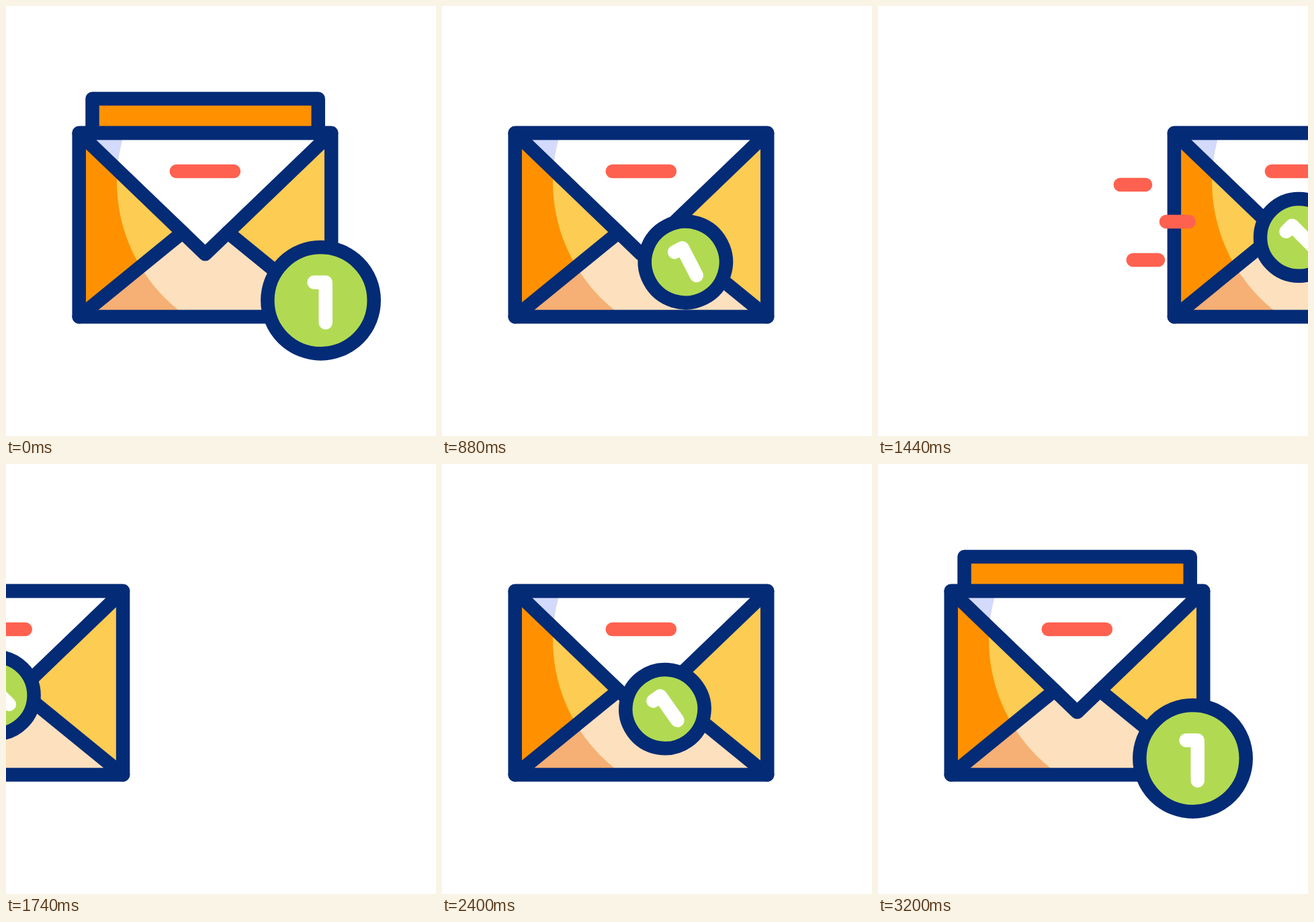
These frames come from a looping animation (640x640 px, 3620 ms). An HTML page:

```html
<!DOCTYPE html>
<html lang="en">
<head>
<meta charset="utf-8">
<title>Mail notification</title>
<style>
  html, body { margin: 0; width: 100%; height: 100%; overflow: hidden; background: #fff; }
  svg { display: block; width: 100vw; height: 100vh; }
  .line { fill: none; stroke: #042b76; }
  .line, .dash, .digit { stroke-width: 20.5; stroke-linecap: round; stroke-linejoin: round; }
  .dash { stroke: #ff6150; }
  .digit { fill: none; stroke: #fff; }
</style>
</head>
<body>
<svg viewBox="0 0 640 640">
  <defs>
    <clipPath id="lit"><circle cx="409" cy="262" r="244"/></clipPath>
    <path id="body" d="M108.7 189H484.2V462.6H108.7Z"/>
    <path id="fold" d="M108.7 462.6L262.8 337H330.1L484.2 462.6Z"/>
    <path id="flap" d="M108.7 189L296.45 369.3L484.2 189Z"/>
  </defs>
  <g id="mail">
    <path id="card" class="line" style="fill:#ff9100" d="M128.5 138H464.7V300H128.5Z"/>
    <use href="#body" fill="#ff9100"/>
    <use href="#fold" fill="#f6af74"/>
    <use href="#flap" fill="#d3dafb"/>
    <g clip-path="url(#lit)">
      <use href="#body" fill="#fdcc52"/>
      <use href="#fold" fill="#fde0be"/>
      <use href="#flap" fill="#fff"/>
    </g>
    <path class="line" d="M108.7 462.6L262.8 337M484.2 462.6L330.1 337"/>
    <use href="#flap" class="line"/>
    <use href="#body" class="line"/>
    <path class="dash" d="M253.7 246H338.9"/>
    <g id="badge">
      <circle class="line" style="fill:#b1da52"/>
      <polyline class="digit"/>
    </g>
  </g>
  <g id="trails"></g>
</svg>
<script>
const LOOP = 3620, END = 3200, TICK = 20;
const $ = s => document.querySelector(s);
const mail = $('#mail'), card = $('#card'), badge = $('#badge');
const disc = $('#badge circle'), digit = $('#badge polyline');

const ramp = (t, a, b) => Math.min(1, Math.max(0, (t - a) / (b - a)));
const smooth = (t, a, b) => { const u = ramp(t, a, b); return u * u * (3 - 2 * u); };
const mix = (a, b, p) => a + (b - a) * p;

// Cubic bezier easing with control points (x1, 0) and (x2, 1).
function bezier(u, x1, x2) {
  let lo = 0, hi = 1;
  for (let i = 0; i < 24; i++) {
    const w = (lo + hi) / 2, v = 1 - w;
    if (3 * w * v * v * x1 + 3 * w * w * v * x2 + w ** 3 < u) lo = w; else hi = w;
  }
  return lo * lo * (3 - 2 * lo);
}

const leave = t => 560 * bezier(ramp(t, 946, 1651), .761, .667);
const arrive = t => 560 * (bezier(ramp(t, 1500, 2259), .333, .24) - 1);

// Each trail: start x, y, travel to the left.
const trails = [[126.7, 266, 150], [185.7, 321, 136], [145.7, 378, 150]].map(([x, y, run]) => {
  const el = document.createElementNS('http://www.w3.org/2000/svg', 'line');
  el.setAttribute('class', 'dash');
  el.setAttribute('y1', y);
  el.setAttribute('y2', y);
  $('#trails').append(el);
  return { el, x, run };
});

function drawTrails(t) {
  const head = smooth(t, 1150, 1630), tail = smooth(t, 1250, 1685), dx = leave(t);
  $('#trails').style.display = head > 0 && tail < 1 ? '' : 'none';
  for (const { el, x, run } of trails) {
    el.setAttribute('x1', dx + x - run * head);
    el.setAttribute('x2', dx + x - run * tail);
  }
}

function drawBadge(t) {
  const seal = smooth(t, 490, 1170) - smooth(t, 2190, 2890);
  const shrink = smooth(t, 460, 1010) - smooth(t, 2320, 2885);
  const k = mix(1, .725, shrink);
  const x = mix(468.5, 294.3, seal), y = mix(438.2, 344.4, seal);
  badge.setAttribute('transform', `translate(${x} ${y}) rotate(${-45 * seal})`);
  disc.setAttribute('r', 79.2 * k);
  digit.setAttribute('points', [-10, -27, 7.2, -27, 7.2, 33].map(n => n * k).join(' '));
}

function draw(t) {
  const drop = smooth(t, 0, 480) - smooth(t, 2720, END);
  card.setAttribute('transform', `translate(0 ${52 * drop})`);
  mail.setAttribute('transform', `translate(${t < 1600 ? leave(t) : arrive(t)} 0)`);
  drawBadge(t);
  drawTrails(t);
}

const start = performance.now();
function frame() {
  const t = (performance.now() - start) % LOOP;
  draw(Math.min(END, Math.floor(t / TICK) * TICK));
  requestAnimationFrame(frame);
}
frame();
</script>
</body>
</html>
```
